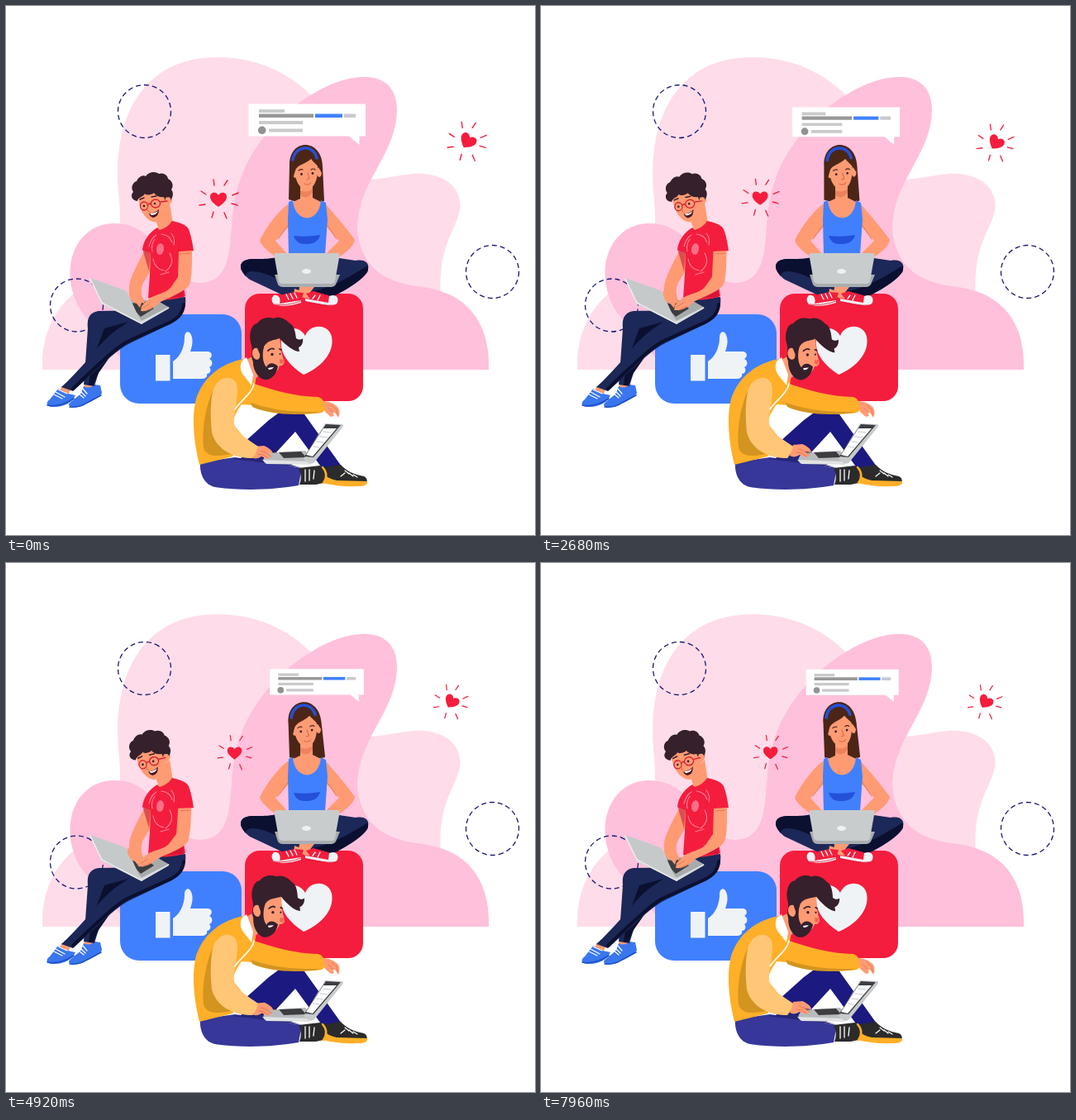
An HTML page without scripts that plays this animation: 640x640 px, repeating every 8000 ms.

```html
<!DOCTYPE html>
<html lang="en">
<head>
<meta charset="utf-8">
<title>Social team</title>
<style>
@property --sway { syntax: "<number>"; inherits: true; initial-value: 0; }
@property --arm { syntax: "<number>"; inherits: true; initial-value: 0; }
@property --type { syntax: "<number>"; inherits: true; initial-value: 0; }
html, body { margin: 0; width: 100%; height: 100%; overflow: hidden; background: #fff; }
svg {
  display: block; width: 100vw; height: 100vh;
  animation: sway 8s infinite, arm 8s infinite, type 8s infinite;
  animation-timing-function: cubic-bezier(.37, 0, .63, 1);
}
@keyframes sway {
  0% { --sway: 0; }
  82.5% { --sway: 1; animation-timing-function: cubic-bezier(.33, 0, .67, .33); }
  100% { --sway: .893; }
}
@keyframes arm { 0%, 100% { --arm: 0; } 60% { --arm: 1; } }
@keyframes type { 0%, 69% { --type: 0; } 34%, 100% { --type: 1; } }

.bubble { transform-origin: 424px 168px; transform: scale(calc(1 - .232 * var(--sway))); }
.burst { transform: translate(calc(var(--x) + var(--dx) * var(--sway)), calc(var(--y) + var(--dy) * var(--sway))) scale(calc(1 - .14 * var(--sway))); }
.turn { transform-origin: var(--o); transform: rotate(calc(var(--a) * var(--sway))); }
.boy-arm { transform-origin: 216px 275px; transform: rotate(calc(2deg * var(--arm))); }
.boy-hand { transform: translate(calc(-2px * var(--arm)), calc(1px * var(--arm))); }
.typing { transform: translate(calc(4px * var(--type)), calc(-2px * var(--type))); }

.skin { fill: #ff9b73; }
.red { fill: #f51d3d; }
.blue { fill: #4080ff; }
.white { fill: #f0f3f6; }
.pale { fill: #ffdce9; }
.pink { fill: #ffc0dc; }
.navy { fill: #1c2857; }
.night { fill: #0b1030; }
.ring { fill: none; stroke: #1b1872; stroke-width: 1.3; stroke-dasharray: 6 4; }
.line { fill: none; stroke-linecap: round; stroke-linejoin: round; }
</style>
</head>
<body>
<svg viewBox="0 0 640 640">
<defs>
  <path id="heart" class="red" d="M0 9C-6 5-10 1-10-3C-10-9-3-10 0-5C3-10 10-9 10-3C10 1 6 5 0 9Z"/>
  <path id="rays" class="line" stroke="#f51d3d" stroke-width="1.4" d="M-6-24L-5-17M11-23L7-17M24-8L17-5M23 7L16 5M10 23L7 16M-8 22L-6 15M-23 7L-16 6M-21-10L-15-6"/>
</defs>

<!-- backdrop -->
<path class="pale" d="M44 440C42 390 66 352 105 333C138 305 140 270 137 235C126 140 162 62 256 62C305 62 343 82 369 108L330 340L270 440Z"/>
<path class="pale" d="M400 205C440 217 462 205 494 203C532 201 553 222 549 247C544 273 522 290 526 352L430 350Z"/>
<path class="pink" d="M150 440C132 415 103 386 90 368C62 320 83 263 131 263C190 263 192 335 235 335C285 333 264 265 282 214C296 168 336 126 370 107C415 79 472 73 473 125C473 180 425 212 425 270C430 325 470 336 505 340C560 348 586 385 584 440Z"/>

<circle class="ring turn" style="--o:167.5px 127.5px;--a:-78deg" cx="167.5" cy="127.5" r="32"/>
<circle class="ring turn" style="--o:85.5px 362px;--a:-78deg" cx="85.5" cy="362" r="32"/>
<circle class="ring turn" style="--o:588.5px 321.5px;--a:78deg" cx="588.5" cy="321.5" r="32"/>

<!-- cards -->
<rect class="blue" x="138" y="373" width="147" height="108" rx="23"/>
<path class="white" d="M181 422H198.500V453.500H181ZM202 430C210 425 216 414 216 401C216 393 222 392 224 398C227 405 225 412 223 418H244C249 418 251 424 246 427C251 429 250 436 246 437C249 440 247 445 243 445C244 449 241 451 236 451H202Z"/>
<rect class="red" x="289" y="348" width="143" height="130" rx="18"/>
<path class="white" d="M360 446C342 434 331 420 333 404C335 388 354 385 362 399C368 384 390 384 394 400C398 420 380 438 360 446Z"/>

<!-- floating pieces -->
<g class="bubble">
  <path fill="#fff" d="M293.500 118.500H435V157.500H427.500V168L415 157.500H293.500Z"/>
  <path fill="#c9cacc" d="M306 125h31v4h-31zM409 130.500h14v4.500h-14zM306 139h53v4h-53zM318 148.500h41v4h-41z"/>
  <path fill="#989898" d="M306 130.500h66v4.500h-66z"/>
  <path class="blue" d="M374 130.500h33v4.500h-33z"/>
  <circle cx="309.700" cy="150.300" r="4.800" fill="#929292"/>
</g>
<g class="burst" style="--x:257px;--y:234px;--dx:23px;--dy:-5px">
  <use href="#heart"/><use href="#rays"/>
</g>
<g class="burst" style="--x:558.500px;--y:163.500px;--dx:-23px;--dy:5px">
  <use href="#heart" transform="rotate(32)"/><use href="#rays" x="-1.300" y=".800"/>
</g>

<!-- boy -->
<g>
  <path class="skin" d="M67 460L78 464L75 471L65 467ZM95 455L107 457L106 465L94 464Z"/>
  <path fill="#3a76ee" d="M63 463L75 469L84 471C80 480 69 486 56 485C48 485 48 479 53 476ZM94 460Q101 464 107 458L114 459L116 468C115 473 105 477 96 482C88 487 76 487 76 482C78 478 86 474 91 468Z"/>
  <path class="line" stroke="#1d4fc4" stroke-width="1.500" d="M50 483Q65 486 82 475M77 485Q89 486 98 480L115 471"/>
  <path class="line" stroke="#fff" stroke-width="1.200" d="M60 467l11 6M58 470l10 5M63 464l11 5M90 466l6 6M88 469l6 5M93 463l5 6"/>
  <path class="navy" d="M172 368L112 369C100 371 98 379 99 390L96 432L94 458L107 460L119 420L121 392L175 380Z"/>
  <path class="night" d="M119 390L170 376L180 385L140 404L112 444L105 459L100 459L104 430Z"/>
  <path class="navy" d="M162 372L190 354L217 352C219 368 211 380 194 387L152 407C134 415 118 433 104 445L81 466L67 461C77 452 87 441 97 430C111 413 124 397 141 387Z"/>
  <path class="line" stroke="#0b1030" stroke-width="4" d="M215 361C214 374 206 380 191 386L151 404C135 411 120 427 104 441L81 463"/>
  <path class="skin" d="M172 288C163 305 149 329 149 341C148 349 152 357 156 360L166 356C163 348 163 342 166 335L180 312Z"/>
  <path class="skin" d="M180 256L198 238L202 264L186 274Z"/>
  <path class="red" d="M183 268L186 271Q196 268 201 260C209 262 218 264 221 270C225 281 226 290 227 296L211 299C211 315 214 333 217 351C205 356 184 357 172 353L174 325L175 299L165 295C166 284 173 274 183 268Z"/>
  <path fill="#c30e33" d="M175 299L165 294Q168 304 173 321ZM209 285L211 301L213 322L207 337L189 348L175 354L215 352L211 314Z" opacity=".55"/>
  <path class="line" stroke="#ff8097" stroke-width="1.100" d="M173 291q3-11 9-14m6-1q10 1 13 10M178 306q2 12 13 14M198 299q7 13-5 22M200 275q5 6 3 14M180 282q-5 7-3 15M187 325l10-3"/>
  <ellipse cx="186.500" cy="294" rx="4.500" ry="7" fill="#ff6d87" transform="rotate(8 186 294)"/>
  <!-- laptop -->
  <path fill="#a7abac" d="M142 354L184 357L198 365L164 384Z"/>
  <path fill="#dadddd" d="M113 359L142 354L164 381L197 364V366L164 385Z"/>
  <path fill="#3d3d40" d="M148 360L169 358L179 366L163 376Z"/>
  <path fill="#c5c9ca" d="M102 329L144 344Q147 346 148 349L164 384L119 362Q115 360 114 356Z"/>
  <path class="line" stroke="#edf0f0" stroke-width="1.400" d="M102 330L115 357Q116 360 120 361L164 384"/>
  <path class="skin boy-hand" d="M149 344C148 351 152 359 158 360L162 365L164 359L168 360L166 354L162 347Z"/>
  <g class="boy-arm">
    <path class="skin" d="M209 297L225 296C225 314 225 329 222 337C218 344 206 349 187 358C180 365 172 370 163 369L164 363L173 354C183 348 192 348 199 341L208 328Z"/>
    <path class="line" stroke="#dc704f" stroke-width=".8" d="M166 365l8-5M169 369l9-5M211 300l12-1"/>
  </g>
  <g class="turn" style="--o:189px 262px;--a:-5.500deg">
    <path class="skin" d="M160 228C160 244 167 258 178 261C189 263 195 250 196 240C203 239 202 229 196 231L188 216Z"/>
    <path fill="#35202c" d="M159 236C152 235 150 229 154 225C150 219 154 213 158 212C160 207 166 204 169 206C173 200 181 200 185 203C190 201 196 205 196 209C202 212 203 218 200 222C204 227 201 233 198 237C195 238 192 236 191 231C185 232 181 229 179 226C174 230 168 228 168 227C166 231 160 231 159 236Z"/>
    <path class="skin" d="M193 232C198 230 201 233 199 238C198 242 194 243 192 241Z"/>
    <path class="line" stroke="#35202c" stroke-width="1.500" d="M162 234l5-2M176 231l6-1"/>
    <g class="line" stroke="#d71c36" stroke-width="1.300">
      <ellipse cx="167" cy="242" rx="4.500" ry="5"/><ellipse cx="181" cy="239" rx="5.500" ry="5"/>
      <path d="M172 240q2-2 3 0M187 237l8-1"/>
    </g>
    <g fill="#2c1822"><circle cx="167" cy="242" r="1.300"/><circle cx="180" cy="239" r="1.300"/></g>
    <path class="line" stroke="#df6f51" stroke-width="1" d="M172 242l-1 6 3 1"/>
    <path fill="#4a1525" d="M173 251Q180 251 185 246Q185 255 178 256Q174 255 173 251Z"/>
    <path fill="#fff" d="M174 251Q180 251 184 248Q182 253 176 253Z"/>
  </g>
</g>

<!-- girl -->
<g>
  <path class="turn" style="--o:364px 217px;--a:-4deg" fill="#4b2617" d="M343 193C342 160 382 159 383 194L385 236Q364 242 342 234Z"/>
  <path class="skin" d="M356 213H371V232L387 240C399 254 414 271 422 283C421 292 408 300 397 308L386 301L403 284L385 264H345L326 284L341 301L330 306C321 300 310 292 307 284C313 270 329 248 341 240L356 233Z"/>
  <path class="line" stroke="#e27954" stroke-width="1" d="M329 282l14-19M400 282l-13-19"/>
  <path class="blue" d="M342 237L347 235C349 263 379 264 381 235L387 238L389 258L386 301H342L341 259Z"/>
  <path fill="#2450da" d="M348 278Q363 280 380 277Q377 288 364 288Q351 289 348 278Z"/>
  <path fill="#ed825c" d="M356 223Q364 227 371 221V226Q364 235 356 229Z"/>
  <g class="turn" style="--o:364px 217px;--a:-4deg">
    <path class="skin" d="M349 194C351 184 362 184 369 177C376 184 378 190 377 202C376 213 371 222 364 222C355 222 349 211 349 194Z"/>
    <ellipse class="skin" cx="350" cy="203" rx="3" ry="5"/><ellipse class="skin" cx="379" cy="201" rx="3" ry="6"/>
    <path fill="#4b2617" d="M345 204C343 182 353 171 365 171C378 171 383 184 382 202L378 195C375 191 372 189 369 185C363 191 352 192 350 199L347 209Z"/>
    <path class="line" stroke="#2450da" stroke-width="3.500" stroke-linecap="butt" d="M347 186C350 168 372 167 376 184"/>
    <path class="line" stroke="#4b2617" stroke-width="1.200" d="M354 199q3-2 5-1M369 198q3-2 5 0"/>
    <g fill="#35202c"><circle cx="357.500" cy="203.500" r="1.400"/><circle cx="371" cy="202.500" r="1.400"/></g>
    <path class="line" stroke="#d76849" stroke-width="1" d="M365 202l2 7-3 1M361 215q4 3 8-1"/>
  </g>
  <path class="navy" d="M331 303C310 309 296 303 287 309C280 315 286 324 295 331L344 354L363 343L382 357C402 350 427 335 437 322C442 310 433 306 423 308L396 304Z"/>
  <path class="night" d="M331 304C310 309 296 303 287 309C281 314 285 321 290 327C290 318 305 319 328 330ZM438 314C421 324 397 340 371 345L382 357C404 348 432 333 438 320Z"/>
  <path class="skin" d="M349 342L374 351L371 355L348 350ZM355 340H373L362 354L354 348Z"/>
  <path class="red" d="M330 350L349 346L360 347L357 357L337 361L328 359ZM363 348L372 345L390 350L398 356L389 361L370 357Z"/>
  <path class="white" d="M324 350C330 349 333 354 331 360L357 356V359C345 363 334 364 324 361Q319 355 324 350ZM391 351C399 348 403 352 401 359Q398 363 389 362L362 357V354L390 359Z"/>
  <path class="line" stroke="#fff" stroke-width="1.300" d="M339 349l3 6M344 348l3 6M349 347l3 6M374 350l-3 4M380 350l-3 6"/>
  <path class="line" stroke="#d71c36" stroke-width=".8" d="M325 361q16 2 32-4M363 358q15 5 35 4"/>
  <path fill="#a9adaf" d="M325 325H404L399 337Q397 340 394 340H335Q331 340 329 337Z"/>
  <path fill="#c8cccd" d="M327 299H401Q404 299 403.500 302L398 333Q397 336 394 336H335Q331 336 330 333L324.500 302Q324 299 327 299Z"/>
  <ellipse cx="363.500" cy="321" rx="5.500" ry="3" fill="#eef1f2"/>
</g>

<!-- man -->
<g>
  <path fill="#1c1980" d="M284 550L289 527L318 501L333 490C341 485 354 486 361 494L406 557L386 564L350 515L327 540L347 555Z"/>
  <path fill="#2b2b2b" d="M386 558L405 555C411 562 421 567 433 569C438 571 438 578 433 579L387 575Z"/>
  <path fill="#ffaf28" d="M384 566Q390 572 400 574L437 575Q438 581 426 581Q402 582 383 577Z"/>
  <path class="line" stroke="#fff" stroke-width="1.200" d="M410 562l5 4M415 565l5 4M420 567l5 3M405 569l5-4"/>
  <path fill="#363798" d="M235 552C234 565 239 579 253 582C287 587 326 585 354 580L358 559L325 553L277 546Z"/>
  <path fill="#272577" d="M274 548L304 545L356 558L324 554Z"/>
  <path fill="#2b2b2b" d="M354 559L380 556C388 559 390 569 384 577L375 579L355 579Q359 569 354 559Z"/>
  <path class="line" stroke="#ffaf28" stroke-width="2.500" d="M383 558Q391 567 384 577"/>
  <path class="line" stroke="#fff" stroke-width="1.300" d="M362 561v14M367 561v13M373 562l-1 10"/>

  <path fill="#ffaf28" d="M300 457C322 464 350 473 378 473Q387 476 386 489L382 492C359 496 322 493 299 483L284 482Z"/>
  <path fill="#d39420" d="M296 480Q324 490 360 491L382 491C356 496 320 495 298 485Z"/>
  <path class="skin" d="M384 478C390 478 398 481 402 486C404 490 404 494 402 498L399 493L395 491L397 496L393 497L386 491Z"/>
  <path class="line" stroke="#df6f51" stroke-width=".8" d="M394 483l6 5 1 7M390 486l6 6"/>

  <path fill="#ffaf28" d="M287 427C256 434 238 451 230 475C225 495 226 522 234 555L274 545L288 522L275 506C275 489 291 478 301 459L303 446Z"/>
  <path fill="#d39420" d="M250 466C240 488 237 517 239 533C240 543 251 546 267 543L284 540L251 513Z"/>
  <path fill="#ffc675" d="M251 463C258 446 279 445 280 463C280 480 275 493 276 506C279 517 291 523 305 533L298 547C276 547 255 538 249 516C247 497 247 478 251 463Z"/>
  <path class="line" stroke="#fff" stroke-width="1.600" d="M300 457C298 469 283 478 277 488"/>
  <path class="skin" d="M290 428L303 422L306 447L298 454Z"/>
  <path fill="#fff" d="M285 430L291 425L299 446L297 459L286 445Q282 438 285 430Z"/>

  <g class="turn" style="--o:303px 437px;--a:4deg">
    <path class="skin" d="M303 409L331 400C332 412 333 420 336 428C338 432 335 436 331 435C329 442 325 446 318 446L304 433Z"/>
    <path fill="#35202c" d="M302 408C300 420 296 432 302 443C307 452 315 455 322 449C326 446 328 441 329 436C324 431 318 431 315 437C310 431 310 420 312 412L309 400Z"/>
    <path fill="#35202c" d="M297 410C293 399 296 385 304 384C309 377 317 376 324 378C329 375 338 378 342 383C349 386 350 395 351 402C354 404 357 404 359 402C360 408 357 412 354 413L355 418C348 418 338 410 331 402C323 405 317 404 312 412L308 426L300 431C295 426 299 419 297 410Z"/>
    <path class="skin" d="M304 414C298 412 296 421 300 426C304 430 308 427 307 421Z"/>
    <path class="line" stroke="#35202c" stroke-width="1.800" d="M317 417q4-4 7-2M331 415l2 1"/>
    <g fill="#35202c"><circle cx="322" cy="421.500" r="1.700"/><circle cx="331.500" cy="421" r="1.100"/></g>
    <path fill="#f5644f" d="M331 427l5 1-1 5-4-1Z"/>
    <path fill="#fff" d="M317 438q4-1 7-1-2 3-6 3Z"/>
  </g>

  <path fill="#b8bbbd" d="M316 541L362 538L371 550L367 554L314 553Q308 549 316 541Z"/>
  <path fill="#e1e3e3" d="M310 549L365 551L371 549L367 555L315 554Z"/>
  <path fill="#3d3d40" d="M330 540L357 539L363 546L336 547Z"/>
  <path fill="#c8cbcc" d="M386 505L407 506Q409 507 407 510L373 552Q370 555 366 553L360 548Z"/>
  <path fill="#3d3e44" d="M387 506L405 507L372 546L361 545Z"/>
  <path fill="#fff" d="M384 511L400 511L371 545L363 543Z"/>
  <path class="line" stroke="#d6d9dc" stroke-width="1.600" d="M384 515l9 1M380 521l9 1M376 527l8 1M372 533l7 1"/>
  <g class="typing">
    <path class="skin" d="M301 533L312 532C317 534 323 538 323 542L315 541L321 545L317 548L309 545C305 548 300 548 297 546Z"/>
    <path class="line" stroke="#df6f51" stroke-width=".8" d="M308 538l7 3 6 4M305 542l6 1 6 4"/>
  </g>
  <path fill="#ffc675" d="M288 522L305 533Q303 542 298 547L281 545Z"/>
</g>
</svg>
</body>
</html>
```
